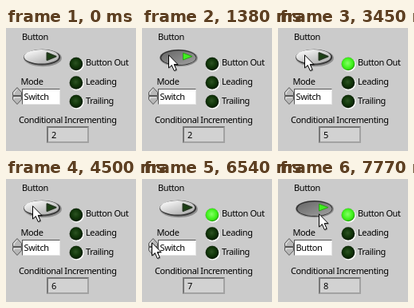
These frames come from a looping animation (163 px wide and 154 px high, 8 s). An HTML page:

```html
<!DOCTYPE html>
<html lang="en">
<head>
<meta charset="utf-8">
<title>Button modes</title>
<style>
  html, body { margin: 0; width: 100%; height: 100%; overflow: hidden; background: #cbcbcb; }
  svg { display: block; width: 163px; height: 154px; }
  text { font: 11px "Noto Sans", "Open Sans", sans-serif; letter-spacing: -.4px; fill: #000; }
</style>
</head>
<body>
<svg viewBox="0 0 163 154">
  <defs>
    <linearGradient id="rim" x1=".1" y1=".1" x2=".9" y2=".9">
      <stop offset=".2" stop-color="#a4a4a4"/><stop offset=".75" stop-color="#fff"/>
    </linearGradient>
    <linearGradient id="ring" x1=".2" y1="0" x2=".8" y2="1">
      <stop offset="0" stop-color="#a8a8a8"/><stop offset=".5" stop-color="#9c9c9c"/><stop offset="1" stop-color="#888"/>
    </linearGradient>
    <linearGradient id="face" x1=".1" y1="0" x2=".9" y2="1">
      <stop offset="0" stop-color="#fff"/><stop offset=".45" stop-color="#d6d6d6"/><stop offset="1" stop-color="#aaa"/>
    </linearGradient>
    <linearGradient id="sunk" x1="0" y1="0" x2="1" y2="1">
      <stop offset="0" stop-color="#666"/><stop offset="1" stop-color="#a0a0a0"/>
    </linearGradient>
    <radialGradient id="off" cx=".46" cy=".44" r=".56">
      <stop offset="0" stop-color="#2c5222"/><stop offset=".5" stop-color="#143a0c"/><stop offset="1" stop-color="#081a04"/>
    </radialGradient>
    <radialGradient id="on" cx=".46" cy=".44" r=".56">
      <stop offset="0" stop-color="#86ff68"/><stop offset=".6" stop-color="#44f420"/><stop offset=".85" stop-color="#34d814"/><stop offset="1" stop-color="#1c7a0c"/>
    </radialGradient>
    <circle id="rimDisc" cx=".4" cy=".4" r="9.2" fill="url(#rim)"/>
  </defs>

  <rect width="163" height="154" fill="#cbcbcb"/>
  <text x="20" y="15">Button</text>
  <text x="100" y="47">Button Out</text>
  <text x="100" y="71">Leading</text>
  <text x="100" y="95">Trailing</text>
  <text x="18.5" y="71">Mode</text>
  <text x="16" y="119">Conditional Incrementing</text>

  <g transform="translate(88 45)"><use href="#rimDisc"/><circle id="out" r="8.3"/></g>
  <g transform="translate(88 68.5)"><use href="#rimDisc"/><circle id="lead" r="8.3"/></g>
  <g transform="translate(88 92)"><use href="#rimDisc"/><circle id="trail" r="8.3"/></g>

  <ellipse cx="46" cy="37.5" rx="24" ry="10.8" fill="url(#ring)"/>
  <g id="up">
    <ellipse cx="45.2" cy="36.6" rx="23" ry="9.8" fill="#3a3a3a"/>
    <ellipse cx="44.4" cy="35.8" rx="21.8" ry="8.8" fill="url(#face)"/>
    <path d="M51.5 31.2L62.5 35.6L51.5 40Z" fill="#1a4212" stroke="#24381f" stroke-width="2" stroke-linejoin="round"/>
  </g>
  <g id="down">
    <ellipse cx="45.5" cy="37" rx="23" ry="10" fill="#333"/>
    <ellipse cx="45.9" cy="37.3" rx="21.6" ry="8.8" fill="url(#sunk)"/>
    <path d="M51.5 31.2L63 35.6L51.5 40Z" fill="#40ee20" stroke="#2c9c18" stroke-linejoin="round"/>
  </g>

  <g fill="#b8b8b8" stroke="#585858" stroke-linejoin="round">
    <path id="inc" d="M14 74.5L19.5 80.5V84.5H8.5V80.5Z"/>
    <path d="M14 95.5L19.5 89.5V85.5H8.5V89.5Z"/>
    <path d="M10 83V81L14 76.5M10 89V87H18" fill="none" stroke="#f0f0f0"/>
  </g>
  <rect x="20" y="76" width="48" height="20" fill="#e4e4e4"/>
  <path d="M20 96V76H68L67 77H21V95Z" fill="#555"/>
  <rect x="21" y="77" width="46" height="18" fill="#fff"/>
  <text id="mode" x="22.5" y="90"></text>

  <rect x="51" y="123" width="53" height="21" fill="#a2a2a2"/>
  <path d="M51 144V123H104L102 125H53V142Z" fill="#777"/>
  <rect x="53" y="125" width="49" height="17" fill="#d2d2d2"/>
  <text id="count" x="57" y="138"></text>

  <g id="cursor">
    <path d="M1.5 2V18L5 15L8.2 22L11.4 20.5L8.4 14H13.5Z" fill="#000" opacity=".22"/>
    <path d="M.5 .8V17L4.3 13.6L7.3 20.5L10.2 19.2L7.2 12.6H12Z" fill="#fff" stroke="#000"/>
  </g>
</svg>
<script>
const LOOP = 8000, STEP = 30;
const $ = id => document.getElementById(id);

// press, response, end of leading pulse, release
const clicks = [
  [1380, 1410, 1440, 1590],
  [2250, 2250, 2280, 2550],
  [3150, 3180, 3210, 3450],
  [4050, 4050, 4110, 4440],
  [5010, 5040, 5070, 5280],
  [7710, 7740, 7770, LOOP]
];
const MODE_AT = 6630;

// time, x, y of the pointer tip
const path = [
  [30, 156, 27], [180, 135, 31], [330, 102, 40], [420, 81, 42], [570, 51, 37], [720, 33, 33],
  [5640, 33, 33], [5820, 21, 62], [5970, 16, 80], [6090, 16, 85],
  [6270, 16, 85], [6540, 12, 79],
  [7020, 12, 79], [7230, 31, 61], [7440, 51, 43], [LOOP, 51, 43]
];

const within = (t, a, b) => t >= a && t < b;

function pointer(t) {
  const i = path.findIndex(p => p[0] > t);
  const [t0, x0, y0] = path[i - 1], [t1, x1, y1] = path[i];
  const k = (t - t0) / (t1 - t0);
  return [x0 + (x1 - x0) * k, y0 + (y1 - y0) * k].map(Math.round);
}

const show = (id, yes) => $(id).setAttribute("visibility", yes ? "visible" : "hidden");
const light = (id, yes) => $(id).setAttribute("fill", yes ? "url(#on)" : "url(#off)");
function write(id, text) {
  if ($(id).textContent !== text) $(id).textContent = text;
}

function draw(time) {
  const t = Math.floor((time % LOOP) / STEP) * STEP;
  const hits = clicks.filter(c => t >= c[1]).length;
  const pressed = clicks.some(c => within(t, c[0], c[3]));
  const buttonMode = t >= MODE_AT;

  show("up", !pressed);
  show("down", pressed);
  light("out", buttonMode ? t >= clicks[5][1] : hits % 2);
  light("lead", clicks.some(c => within(t, c[1], c[2])));
  light("trail", clicks.some(c => within(t, c[3] + 30, c[3] + 60)));
  write("mode", buttonMode ? "Button" : "Switch");
  write("count", String(2 + hits));
  $("inc").setAttribute("fill", within(t, 6600, 6690) ? "#858585" : "#b8b8b8");

  const entered = t >= path[0][0];
  show("cursor", entered);
  if (entered) $("cursor").setAttribute("transform", `translate(${pointer(t)})`);
}

const start = performance.now();
function tick() {
  draw(performance.now() - start);
  requestAnimationFrame(tick);
}
tick();
</script>
</body>
</html>
```
